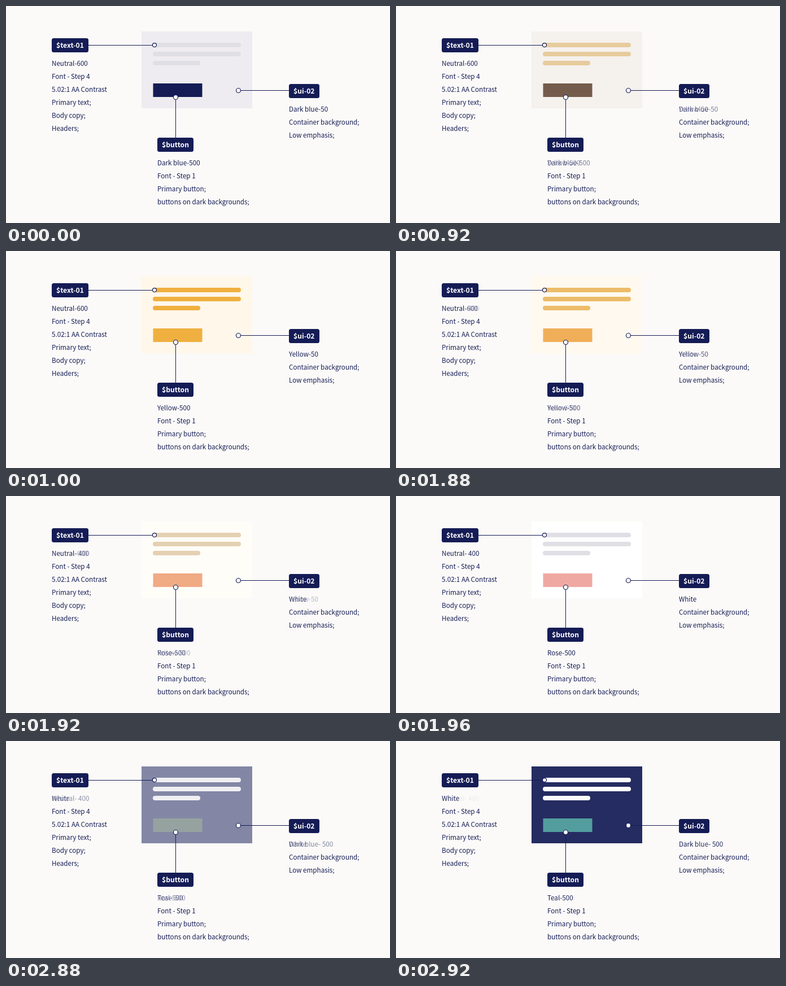
These frames come from a looping animation (680 by 384 pixels, 3.96 s). An HTML page:

```html
<!DOCTYPE html>
<html lang="en">
<head>
<meta charset="utf-8">
<title>Design tokens</title>
<style>
  html, body { margin: 0; width: 100%; height: 100%; overflow: hidden; background: #fbfaf8; }
  svg { display: block; width: 100%; height: 100%; }
  text { font-family: "Noto Sans CJK JP", "Noto Sans CJK SC", "Noto Sans CJK", sans-serif; font-size: 11.65px; fill: #151c55; }
  .chip text { font-size: 12.2px; font-weight: 700; fill: #fff; }
  .chip rect { fill: #151c55; }
  .link { stroke: #151c55; fill: none; }
  circle.link { fill: #fff; stroke-width: 1.2; }
  .swap { isolation: isolate; }
  .swap text { mix-blend-mode: plus-lighter; }
</style>
</head>
<body>
<svg id="stage" viewBox="0 0 680 384"></svg>
<script>
const LOOP = 3960;
const ROW = 23;
const stage = document.getElementById('stage');

// One entry per theme, in playing order.
const themes = [
  { card: [238, 236, 240], bars: [224, 223, 229], button: [21, 28, 85] },
  { card: [255, 247, 234], bars: [240, 176, 64], button: [240, 176, 64] },
  { card: [255, 255, 255], bars: [224, 223, 229], button: [240, 168, 162] },
  { card: [21, 28, 85], bars: [255, 255, 255], button: [71, 156, 158] }
];

// Start time and position along the themes; each value is held.
const steps = [
  [0, 0], [920, 0.435], [960, 0.87], [1000, 1],
  [1880, 1.25], [1920, 1.69], [1960, 2],
  [2840, 2.12], [2880, 2.53], [2920, 2.93]
];

const notes = [
  {
    label: '$text-01', x: 81, y: 57, width: 65,
    line: 'M146 69.5H260', dot: [263, 69.1, 3.5],
    names: ['Neutral-600', 'Neutral-600', 'Neutral- 400', 'White'],
    rows: ['Font - Step 4', '5.02:1 AA Contrast', 'Primary text;', 'Body copy;', 'Headers;']
  },
  {
    label: '$ui-02', x: 501, y: 138, width: 54,
    line: 'M415 149.5H501', dot: [411.5, 149.5, 4],
    names: ['Dark blue-50', 'Yellow-50', 'White', 'Dark blue- 500'],
    rows: ['Container background;', 'Low emphasis;']
  },
  {
    label: '$button', x: 268, y: 233, width: 64,
    line: 'M300.5 165V233', dot: [300.5, 161.5, 4],
    names: ['Dark blue-500', 'Yellow-500', 'Rose-500', 'Teal-500'],
    rows: ['Font - Step 1', 'Primary button;', 'buttons on dark backgrounds;']
  }
];

function add(parent, tag, attrs = {}, content = '') {
  const node = document.createElementNS('http://www.w3.org/2000/svg', tag);
  for (const key in attrs) node.setAttribute(key, attrs[key]);
  node.textContent = content;
  return parent.appendChild(node);
}

function rect(parent, x, y, width, height, rx = 0) {
  return add(parent, 'rect', { x, y, width, height, rx });
}

const parts = {};
for (const name of ['card', 'bars', 'button']) parts[name] = add(stage, 'g');
rect(parts.card, 240, 45, 196, 136);
[156, 156, 84].forEach((width, i) => rect(parts.bars, 260, 65 + 16 * i, width, 8, 4));
rect(parts.button, 260.5, 137, 87, 24);

const swaps = notes.map(({ label, x, y, width, line, dot, names, rows }) => {
  add(stage, 'path', { class: 'link', d: line });
  add(stage, 'circle', { class: 'link', cx: dot[0], cy: dot[1], r: dot[2] });

  const chip = add(stage, 'g', { class: 'chip' });
  rect(chip, x, y, width, 25, 3.5);
  add(chip, 'text', { x: x + 8, y: y + 17 }, label);

  const top = y + 49;
  rows.forEach((row, i) => add(stage, 'text', { x, y: top + ROW * (i + 1) }, row));
  const group = add(stage, 'g', { class: 'swap' });
  return names.map(name => add(group, 'text', { x, y: top }, name));
});

function draw(time) {
  const position = steps.findLast(([start]) => start <= time)[1];
  const index = Math.floor(position);
  const mix = position - index;
  const from = themes[index];
  const to = themes[Math.min(index + 1, themes.length - 1)];

  for (const name in parts) {
    const color = from[name].map((c, i) => Math.round(c + (to[name][i] - c) * mix));
    parts[name].setAttribute('fill', `rgb(${color})`);
  }
  for (const texts of swaps) {
    texts.forEach((text, i) => {
      text.style.opacity = Math.max(0, 1 - Math.abs(position - i));
    });
  }
}

const begin = performance.now();
function tick() {
  draw((performance.now() - begin) % LOOP);
  requestAnimationFrame(tick);
}
draw(0);
requestAnimationFrame(tick);
</script>
</body>
</html>
```
